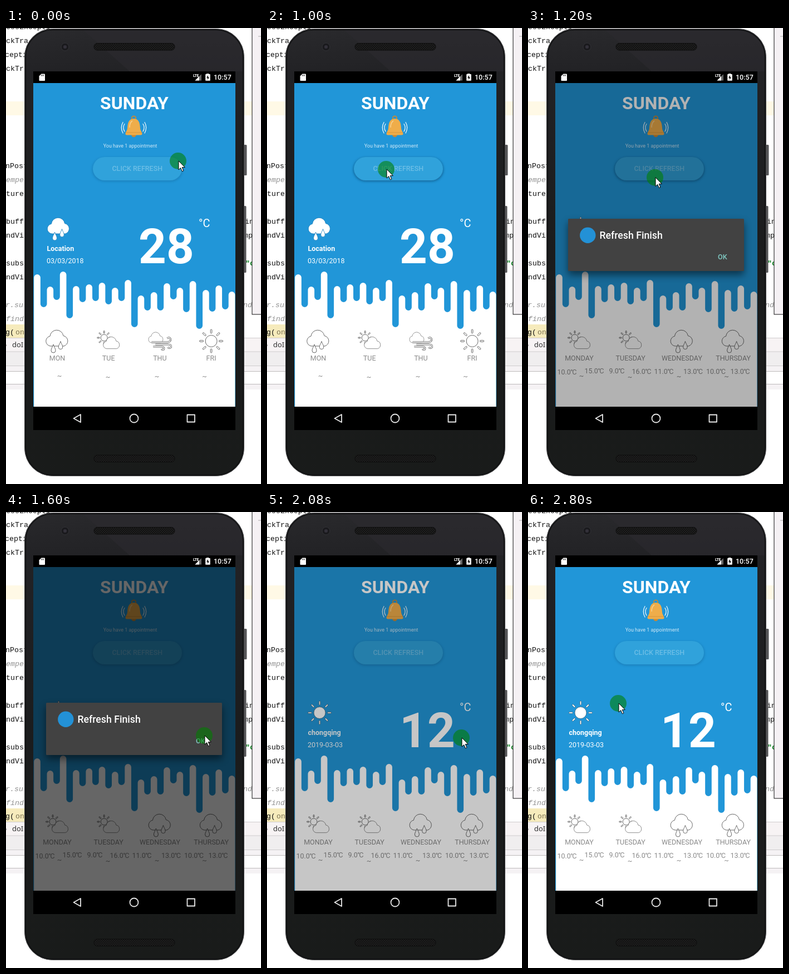
Recreate the animation shown at these times as an HTML page. Size 458 by 820 pixels, loop 3280 ms.

```html
<!DOCTYPE html>
<html lang="en">
<head>
<meta charset="utf-8">
<title>Weather refresh</title>
<style>
html, body { margin: 0; width: 100%; height: 100%; overflow: hidden; background: #fff; }
svg { display: block; width: 458px; height: 820px; font-family: Roboto, "Noto Sans CJK SC", "Noto Sans CJK", sans-serif; font-size: 12.5px; }
.code { font-family: "Liberation Mono", monospace; font-size: 13.3px; fill: #111; white-space: pre; }
.code .note { fill: #909090; font-style: italic; }
.code .str { fill: #0a7f1d; font-weight: bold; }
.mid { text-anchor: middle; }
.bold { font-weight: 700; }
.med { font-weight: 500; }
.line { fill: #fff; stroke: #565656; stroke-width: .9; }
.rain { fill: #fff; stroke: #2383bd; stroke-width: .9; }
.sunny { fill: #fff; stroke: #35576b; stroke-width: .7; }
.grey { fill: #8a8a8a; }
</style>
</head>
<body>
<svg viewBox="0 0 458 820">
  <defs>
    <linearGradient id="shell" x1="0" y1="0" x2="0" y2="1">
      <stop offset="0" stop-color="#29292c"/><stop offset=".1" stop-color="#222225"/>
      <stop offset=".5" stop-color="#1b1c1d"/><stop offset="1" stop-color="#191b1a"/>
    </linearGradient>
    <pattern id="mesh" width="4" height="4" patternUnits="userSpaceOnUse">
      <rect width="4" height="4" fill="#111"/><circle cx="1" cy="1" r=".8" fill="#303030"/><circle cx="3" cy="3" r=".8" fill="#303030"/>
    </pattern>
    <filter id="soft" x="-20%" y="-50%" width="140%" height="200%"><feGaussianBlur stdDeviation="2"/></filter>
    <filter id="wide" x="-20%" y="-50%" width="140%" height="200%"><feGaussianBlur stdDeviation="7"/></filter>
    <clipPath id="screen"><rect x="49" y="99" width="363" height="582"/></clipPath>
  </defs>

  <g id="editor">
    <rect width="458" height="820" fill="#fff"/>
    <rect y="132" width="458" height="25" fill="#fff9e6"/>
    <rect y="533" width="40" height="25" fill="#f6ebbc"/>
    <rect y="558" width="458" height="24" fill="#f7f3f4"/>
    <rect y="582" width="458" height="25" fill="#f0eeef"/>
    <rect y="607" width="458" height="43" fill="#f5f2f4"/>
    <path d="M0 557.5H458M0 582H458M0 607.5H458" stroke="#cfcccd"/>
    <rect x="-1" y="617.5" width="460" height="23" fill="#fff" stroke="#bdbabb"/>
    <g class="code" id="code"></g>
    <text x="-2" y="574" font-family="Noto Sans, sans-serif" font-size="13" fill="#222"><tspan fill="#999">›</tspan> <tspan x="11" fill="#333">doI</tspan></text>
    <rect x="442" y="-1" width="20" height="516" fill="#f5f1f4" stroke="#111"/>
    <path d="M453 15h5" stroke="#aaa"/>
  </g>

  <g id="phone">
    <rect x="427" y="210" width="5.5" height="55" rx="1.5" fill="#565658"/>
    <rect x="427" y="320" width="4.5" height="120" rx="1.5" fill="#565658"/>
    <rect x="33.5" y="1.5" width="394" height="804" rx="50" fill="url(#shell)" stroke="#454547"/>
    <path d="M138 3H378Q424 6 425 52V78H222Z" fill="#2c2b30" opacity=".55"/>
    <rect x="35.5" y="3.5" width="390" height="800" rx="48" fill="none" stroke="#111213" stroke-width="1.5"/>
    <circle cx="106" cy="34" r="7" fill="#1a1a1d" stroke="#333337"/>
    <circle cx="106" cy="34" r="3" fill="#33313a"/>
    <rect x="158" y="27.5" width="145" height="12.5" rx="6" fill="url(#mesh)" stroke="#0d0d0d"/>
    <rect x="158" y="768" width="145" height="12.5" rx="6" fill="url(#mesh)" stroke="#0d0d0d"/>
    <rect x="49" y="78" width="363" height="645" fill="#000"/>
  </g>

  <g id="status" fill="#fff">
    <path d="M63.5 82.500H69q1 0 1 1V94q0 1 -1 1H60.500q-1 0 -1 -1V86.500Z"/>
    <path d="M63.500 84v2.500M65.500 84v2.500M67.500 84v2.500" stroke="#000" stroke-width=".8"/>
    <text x="336" y="88" font-size="7" class="bold" letter-spacing="-.5">LTE</text>
    <path d="M351 83V94.500H339.500Z" fill="#666"/><path d="M347 87V94.500H339.500Z"/>
    <path d="M360 83V82h4.500v1H366q.8 0 .8 .8V94q0 .8 -.8 .8H359q-.8 0 -.8 -.8V83.800q0 -.8 .8 -.8Z"/>
    <path d="M363 85l-3 4.500h2V93l3 -4.500h-2Z" fill="#000"/>
    <text x="373" y="93" class="med">10:57</text>
  </g>
  <g fill="none" stroke="#e8e8e8" stroke-width="1.800" stroke-linejoin="round">
    <path d="M134 695V709L121.500 702Z"/><circle cx="230" cy="702" r="7.500"/><rect x="325.500" y="695.500" width="13.500" height="13"/>
  </g>

  <g clip-path="url(#screen)">
    <rect x="49" y="99" width="363" height="582" fill="#2196d8"/>
    <path id="wave" fill="#fff"/>
    <text x="230.500" y="146" class="mid bold" font-size="32" fill="#fff">SUNDAY</text>
    <g id="bell">
      <circle cx="229.500" cy="162" r="3.700" fill="none" stroke="#c98934" stroke-width="1.800"/>
      <circle cx="229.500" cy="192" r="4.300" fill="#c98934"/>
      <path d="M229.500 163C239 163 240.500 172 241 180C241.300 185 244.500 187 244.500 190.500Q244.500 192.500 242 192.500H217Q214.500 192.500 214.500 190.500C214.500 187 217.700 185 218 180C218.500 172 220 163 229.500 163Z" fill="#efad4a"/>
      <path d="M222 179Q222 170 227 167" fill="none" stroke="#f9d08c" stroke-width="1.500"/>
      <path d="M215 188H244" stroke="#d6943b"/>
      <path d="M213 172.500Q208.800 179 213 186M210 169.500Q204.500 179 210 189M246 172.500Q250.200 179 246 186M249 169.500Q254.500 179 249 189" fill="none" stroke="#e6f4fc" stroke-width="1.300" stroke-linecap="round"/>
    </g>
    <text x="223" y="214.500" class="mid" font-size="9" fill="#fff" fill-opacity=".78">You have 1 appointment</text>
    <rect id="lift" x="155" y="233" width="162" height="43" rx="21.500" fill="#084a74" filter="url(#soft)"/>
    <rect x="156" y="232" width="160" height="42" rx="21" fill="#30a2db"/>
    <text x="235.800" y="257" class="mid med" fill="#6cbee6">CLICK REFRESH</text>
    <text x="346" y="358" font-size="20" fill="#fff">°C</text>
    <g id="before"></g>
    <g id="after"></g>
    <g class="grey mid"><text x="96" y="630">~</text><text x="183" y="632">~</text><text x="271" y="631">~</text><text x="356.500" y="631">~</text></g>
    <rect id="dim" x="49" y="99" width="363" height="582"/>
    <g id="dialog">
      <rect x="72" y="350" width="316" height="94" fill="#000" opacity=".5" filter="url(#wide)"/>
      <rect x="72" y="343" width="316" height="94" rx="1.500" fill="#424242"/>
      <circle cx="107.300" cy="372.800" r="14.200" fill="#2391d6"/>
      <text x="128.500" y="379" class="med" font-size="17.700" fill="#fff">Refresh Finish</text>
      <text x="341" y="416" class="med" fill="#80cbc4">OK</text>
    </g>
  </g>

  <g id="cursor">
    <circle r="15" fill="#008000" fill-opacity=".58"/>
    <path d="M1 0V16L4.700 12.600L7.300 18.800L9.900 17.700L7.300 11.600H12.300Z" fill="#fff" stroke="#000" stroke-linejoin="round"/>
  </g>
</svg>
<script>
const $ = id => document.getElementById(id);
const LOOP = 3280, STEP = 40;

// Code visible beside the phone: x, baseline, text, class
$('code').innerHTML = [
  [-8, 2, 'cessExcepti'], [0, 27, 'ckTra'], [-2, 52, 'ceptio'], [0, 77, 'ckTr'],
  [-1, 252, 'nPost'], [0, 277, 'empe', 'note'], [0, 302, 'ture'], [0, 352, 'buff'],
  [0, 377, 'ndVi'], [0, 427, 'subs'], [0, 452, 'ndVi'], [-1, 502, 'r.su', 'note'],
  [0, 527, 'find', 'note'], [429, 352, 'in'], [427, 377, 'mp'], [430, 427, '"c', 'str'], [426, 502, 'nd', 'note']
].map(([x, y, s, c = '']) => `<text x="${x}" y="${y}" class="${c}">${s}</text>`).join('') +
  '<text x="-1" y="551">g(<tspan x="17" fill="#7d7453">on</tspan></text>';

// Alternating crests and drips, each closed by a half circle
const levels = [443, 502, 465, 489, 438, 522, 464, 493, 461, 491, 458, 497, 467, 491, 453, 538,
  481, 508, 475, 508, 459, 488, 467, 511, 455, 541, 471, 510, 463, 506, 474];
const BAR = 11.65, R = BAR / 2;
$('wave').setAttribute('d', 'M50.2 681' + levels.map((y, i) => {
  const x = 50.2 + i * BAR, up = i % 2 === 0;
  return `V${up ? y + R : y - R}A${R} ${R} 0 0 ${up ? 1 : 0} ${x + BAR} ${up ? y + R : y - R}`;
}).join('') + 'V681Z');

const at = (x, y, s, body) => `<g transform="translate(${x} ${y}) scale(${s})">${body}</g>`;
const cloud = '<path d="M-12 9A9 9 0 0 1 -13 -8.8A12.1 12.1 0 0 1 11 -9.5A9.5 9.5 0 0 1 12 9Z"/>';
const drop = '<path d="M0 -9C1 -5 4 -2 4 2A4 4 0 0 1 -4 2C-4 -2 -1 -5 0 -9Z"/>';
const rays = (r, len, w) => Array.from({length: 8}, (_, i) =>
  `<rect x="${-w / 2}" y="${-r - len}" width="${w}" height="${len}" rx="${w / 2}" transform="rotate(${i * 45})"/>`).join('');
const tube = d => `<path d="${d}" fill="none" stroke-width="3"/><path d="${d}" fill="none" stroke="#fff" stroke-width="1.4"/>`;

const icons = {
  rain: cloud + at(-7, 15, 1, drop) + at(6, 9, .95, drop),
  sun: '<circle r="10.500"/>' + rays(14, 7, 2.6),
  partly: at(-8, -6, 1, '<circle r="6"/>' + rays(8, 4.5, 1.8)) + at(5.5, 7, .74, cloud),
  wind: at(-7, -3, .66, cloud) +
    tube('M-15 2H14Q20 1 19 -4Q17 -8 13 -5') + tube('M-8 6H15Q21 6 20 11Q17 14 14 11') + tube('M-12 10H4Q9 11 7 15Q4 16 3 14')
};
const icon = (name, x, y, cls) => `<g class="${cls}">${at(x, y, 1, icons[name])}</g>`;

const scene = (kind, cls, place, date, temp, days) =>
  icon(kind, 94.5, 361, cls) +
  `<g fill="#fff"><text x="73.500" y="401" class="bold">${place}</text><text x="73" y="423">${date}</text>
   <text x="288" y="423" class="mid bold" font-size="87">${temp}</text></g>` +
  days.map(([k, name], i) => icon(k, 92 + i * 92.2, 563, 'line') +
    `<text x="${92 + i * 92.2}" y="598" class="mid grey">${name}</text>`).join('');

$('before').innerHTML = scene('rain', 'rain', 'Location', '03/03/2018', 28,
  [['rain', 'MON'], ['partly', 'TUE'], ['wind', 'THU'], ['sun', 'FRI']]);
$('after').innerHTML = scene('sun', 'sunny', 'chongqing', '2019-03-03', 12,
  [['partly', 'MONDAY'], ['partly', 'TUESDAY'], ['rain', 'WEDNESDAY'], ['rain', 'THURSDAY']]) +
  [[52.5, 623, '10.0'], [101.5, 621, '15.0'], [145.5, 621, '9.0'], [186.5, 622, '16.0'],
   [226.5, 622, '11.0'], [279, 622, '13.0'], [320, 622, '10.0'], [363.5, 622, '13.0']]
    .map(([x, y, s]) => `<text x="${x}" y="${y}" class="grey">${s}℃</text>`).join('');

// Piecewise linear track of [time, ...values]
function track(keys, t) {
  let i = 1;
  while (i < keys.length - 1 && keys[i][0] < t) i++;
  const a = keys[i - 1], b = keys[i];
  const k = Math.min(1, Math.max(0, (t - a[0]) / (b[0] - a[0])));
  return a.slice(1).map((v, n) => v + (b[n + 1] - v) * k);
}
const path = [[40, 309, 239], [160, 288, 251], [280, 234, 275], [360, 204, 281], [420, 201, 272], [520, 214, 254],
  [1120, 214, 254], [1240, 235, 276], [1360, 279, 328], [1480, 336, 386], [1560, 355, 401], [1600, 356, 402],
  [1760, 355, 405], [1880, 349, 406], [2080, 349, 406], [2160, 315, 395], [2280, 228, 371], [2360, 182, 357],
  [2440, 152, 347], [2520, 136, 343], [2640, 146, 343], [2800, 162, 344]];
const dim = [[1080, 0], [1120, .1], [1320, .6], [1980, .6], [2080, .225], [2160, 0]];
const box = [[1060, 0], [1120, .7], [1160, 1], [1960, 1], [2060, 0]];
const lift = [[800, .28], [960, .6], [1160, .6], [1360, .28]];

function draw(now) {
  let t = now % LOOP;
  t -= t % STEP;
  const [x, y] = track(path, t);
  $('cursor').setAttribute('transform', `translate(${x} ${y})`);
  $('dim').setAttribute('opacity', track(dim, t)[0]);
  $('dialog').setAttribute('opacity', track(box, t)[0]);
  $('lift').setAttribute('opacity', track(lift, t)[0]);
  const fresh = t >= 1200;
  $('before').style.display = fresh ? 'none' : '';
  $('after').style.display = fresh ? '' : 'none';
}
const start = performance.now();
function tick() {
  draw(performance.now() - start);
  requestAnimationFrame(tick);
}
tick();
</script>
</body>
</html>
```
